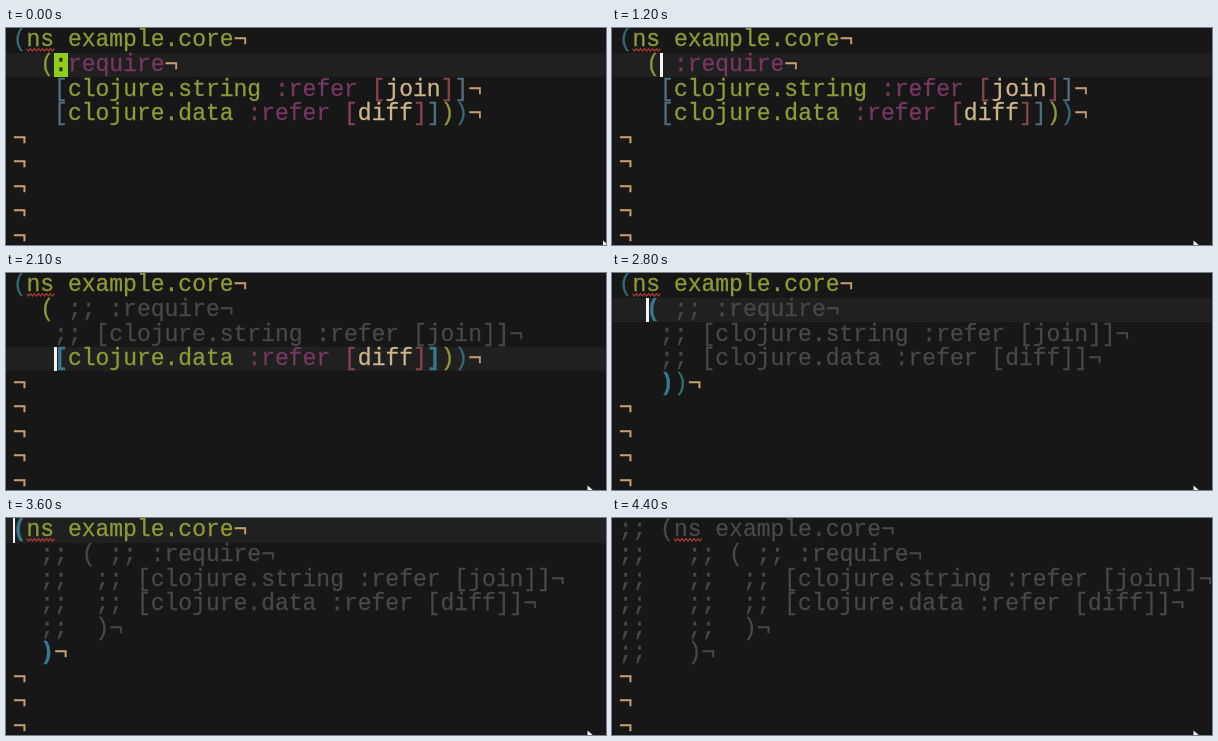
An HTML page for the animation above (4.8 s loop, 600 by 217 pixels).

```html
<!DOCTYPE html>
<html lang="en">
<head>
<meta charset="utf-8">
<title>Commenting nested forms</title>
<style>
  html, body { margin: 0; width: 600px; height: 217px; overflow: hidden; background: #171717; }
  #stage { position: relative; width: 600px; height: 217px; overflow: hidden; background: #171717; }
  .row {
    position: absolute; left: 6.7px; height: 24.5px; line-height: 24.5px; white-space: pre;
    font-family: "Liberation Mono", "DejaVu Sans Mono", monospace; font-size: 23px;
    -webkit-text-stroke: 0.3px;
  }
  #line { position: absolute; left: 0; width: 600px; height: 24.5px; background: #202020; }
  #caret { position: absolute; height: 24.5px; }
  svg { position: absolute; left: 0; top: 0; }
  .o { color: #8f9a37; }
  .p { color: #753862; }
  .w { color: #ccb48c; }
  .e { color: #c59e72; }
  .t { color: #356a73; }
  .s { color: #507080; }
  .r { color: #86444e; }
  .m { color: #36798e; font-weight: bold; }
  .c { color: #484848; }
  .k { color: #20260c; }
</style>
</head>
<body>
<div id="stage">
  <div id="line"></div>
  <div id="caret"></div>
  <div id="text"></div>
  <svg width="600" height="217">
    <path id="wave" fill="none" stroke="#a83a32" stroke-width="1.2"/>
    <path id="mouse" d="M0 0 L0 9 L7 6 Z" fill="#f2f2f2"/>
  </svg>
</div>
<script>
const LOOP = 4800, COL = 13.8, ROW = 24.55, LEFT = 6.7, TOP = 0.4, ROWS = 9;
const $ = id => document.getElementById(id);

// The first letter of each token is its colour class.
const head = (paren = 't') => [paren + '(', 'ons example.core', 'e¬'];
const spec = (name, fn, bracket = 's') =>
  ['o   ', bracket + '[', 'oclojure.' + name, 'o ', 'p:refer', 'o ', 'r[', 'w' + fn, 'r]', bracket + ']'];
const note = text => ['c' + text + '¬'];

const STRING = '[clojure.string :refer [join]]';
const DATA = '[clojure.data :refer [diff]]';
const tail = ['o)', 't)', 'e¬'];
const required = ['o  (', 'c ;; :require¬'];
const stringRow = bracket => [...spec('string', 'join', bracket), 'e¬'];
const dataRow = bracket => [...spec('data', 'diff', bracket), ...tail];

// caret: [row, column, block shape]
const states = [
  { at: 0, caret: [1, 3, true], rows: [
    head(), ['o  (', 'k:', 'prequire', 'e¬'], stringRow(), dataRow()] },
  { at: 1200, caret: [1, 3], rows: [
    head(), ['o  ( ', 'p:require', 'e¬'], stringRow(), dataRow()] },
  { at: 1400, caret: [2, 3], rows: [
    head(), required, stringRow('m'), dataRow()] },
  { at: 2100, caret: [3, 3], rows: [
    head(), required, note('   ;; ' + STRING), dataRow('m')] },
  { at: 2800, caret: [1, 2], rows: [
    head(), ['m  (', 'c ;; :require¬'], note('   ;; ' + STRING),
    note('   ;; ' + DATA), ['m   )', 't)', 'e¬']] },
  { at: 3500, caret: [0, 0], rows: [
    head('m'), note('  ;; ( ;; :require'), note('  ;;  ;; ' + STRING),
    note('  ;;  ;; ' + DATA), note('  ;;  )'), ['m  )', 'e¬']] },
  { at: 4200, wave: 4, rows: [
    note(';; (ns example.core'), note(';;   ;; ( ;; :require'),
    note(';;   ;;  ;; ' + STRING), note(';;   ;;  ;; ' + DATA),
    note(';;   ;;  )'), note(';;   )')] }
];

function wavePath(col) {
  const points = Array.from({ length: 15 }, (_, i) =>
    `${LEFT + col * COL + i * 2} ${i % 2 ? 23 : 20.6}`);
  return 'M' + points.join('L');
}

function show({ caret, rows, wave = 1 }) {
  $('text').innerHTML = Array.from({ length: ROWS }, (_, i) => {
    const spans = (rows[i] || ['e¬']).map(s => `<span class="${s[0]}">${s.slice(1)}</span>`);
    return `<div class="row" style="top:${TOP + i * ROW}px">${spans.join('')}</div>`;
  }).join('');
  $('wave').setAttribute('d', wavePath(wave));
  $('line').hidden = $('caret').hidden = !caret;
  if (!caret) return;
  const [row, col, block] = caret;
  $('line').style.top = row * ROW + 'px';
  Object.assign($('caret').style, {
    top: row * ROW + 'px',
    left: LEFT + col * COL + 'px',
    width: (block ? COL : 2.6) + 'px',
    background: block ? '#8fce1d' : '#f4f4f4'
  });
}

const start = performance.now();
let current;

function tick() {
  const t = (performance.now() - start) % LOOP;
  const state = states.findLast(s => s.at <= t);
  if (state !== current) show(current = state);
  $('mouse').setAttribute('transform', `translate(${t < 400 ? 597 : 581.5} 212.5)`);
  requestAnimationFrame(tick);
}
tick();
</script>
</body>
</html>
```
